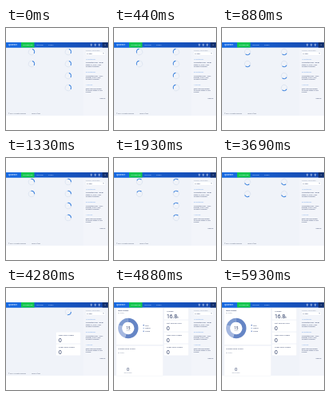
Write an HTML page that moves like this. It is 128 px wide and 128 px high and loops after 8.18 s.

```html
<!DOCTYPE html>
<html lang="en">
<head>
<meta charset="utf-8">
<title>Work order dashboard</title>
<style>
html, body { margin: 0; width: 100%; height: 100%; overflow: hidden; background: #fff; }
svg { display: block; width: 100vw; height: 100vh; font-family: Roboto, Arial, sans-serif; }
</style>
</head>
<body>
<svg id="stage" viewBox="0 0 128 128"></svg>
<script>
const LOOP = 8180, FIRST = 135, STEP = 147.9, TURN = 77, START = -22;
const BLUE = '#2b78dc', NAVY = '#2c3c66', GREY = '#8a94aa';

const rect = (x, y, w, h, fill, more = '') =>
  `<rect x="${x}" y="${y}" width="${w}" height="${h}" fill="${fill}" ${more}/>`;
const text = (x, y, size, fill, str, more = '') =>
  `<text x="${x}" y="${y}" font-size="${size}" fill="${fill}" ${more}>${str}</text>`;
const ring = (x, y, r, color, width, more = '') =>
  `<circle cx="${x}" cy="${y}" r="${r}" fill="none" stroke="${color}" stroke-width="${width}" ${more}/>`;
const card = (x, y, w, h) =>
  rect(x, y + .3, w, h, '#e3e7f0', 'rx=".5"') + rect(x, y, w, h, '#fff', 'rx=".5"');

function header() {
  const icons = [107, 112, 117].map(x =>
    ring(x, 20.7, .75, '#e6efff', .55) + rect(x - .8, 21.8, 1.6, .6, '#e6efff')).join('');
  return rect(0, 18, 128, 6.5, 'url(#bar)') + rect(0, 18, 19, 6.5, '#1769e0') +
    rect(19, 18, 16.5, 6.5, '#12c64f') + rect(121, 18, 7, 6.5, '#12306f') +
    text(3, 22.1, 2.8, '#fff', 'opsmere') +
    text(21.5, 22, 2.1, '#fff', 'DASHBOARD') +
    text(38, 22, 2.1, '#dce8ff', 'ANALYZE') + text(53, 22, 2.1, '#dce8ff', 'TOOLS') +
    icons + text(124.5, 22.1, 2.4, '#fff', '≡', 'text-anchor="middle"');
}

function sidebar() {
  const news = [
    [39.6, '12 minutes ago', ['Completed order - Pump', 'station 2, Floor 1 was', 'closed by Operator']],
    [55.8, '25 minutes ago', ['Completed order - Main', 'building, Floor 2 was', 'closed by Operator']],
    [71.8, '1 hour ago', ['New order was added', 'for Pump station 2 and', 'is open']]
  ];
  return rect(97, 24.5, 31, 85.5, '#f3f5fa') +
    text(100, 28.6, 2, GREY, 'LATEST ACTIVITIES') +
    rect(100, 30, 24.5, 4.2, '#fff', 'stroke="#e2e7f0" stroke-width=".3"') +
    text(101, 32.9, 2, NAVY, 'All Sites') +
    '<path d="M121.4 31.6h1.6l-.8 1z" fill="#607092"/>' +
    news.map(([y, when, lines]) => text(100, y, 1.8, '#6a9ee5', when) +
      lines.map((s, i) => text(100, y + 4.8 + i * 2.4, 2.05, NAVY, s)).join('')).join('') +
    text(124.5, 88.6, 2, NAVY, 'View all', 'text-anchor="end"');
}

function metric(id, y, label, value, unit = '') {
  return `<g id="${id}">` + card(63, y, 30.5, 14.3) +
    text(66, y + 5, 2.4, NAVY, label) +
    text(66, y + 12.6, 6.8, NAVY, `${value}<tspan font-size="3">${unit}</tspan>`) + '</g>';
}

function donut() {
  const len = 2 * Math.PI * 10.2;
  const parts = [[0, .55, '#6585c5'], [.55, .25, '#a5b8e0'], [.8, .2, '#7d9ad0']];
  return parts.map(([from, part, color]) =>
    ring(17.8, 50.5, 10.2, color, 5,
      `stroke-dasharray="${part * len} ${len}" transform="rotate(${from * 360 - 90} 17.8 50.5)"`)).join('');
}

function orders() {
  const legend = [['#6585c5', 'Open'], ['#a5b8e0', 'Waiting'], ['#7d9ad0', 'Closed']];
  return '<g id="orders">' + card(3, 25.4, 58.5, 46.2) +
    text(5, 29.1, 2.4, NAVY, 'Work Orders', 'font-weight="500"') +
    text(5, 32.2, 1.9, GREY, 'By status') + donut() +
    text(17.8, 51.8, 4.6, NAVY, '15', 'text-anchor="middle"') +
    text(17.8, 54.4, 1.8, GREY, 'Orders', 'text-anchor="middle"') +
    legend.map(([color, label], i) => rect(36.5, 46 + i * 3.8, 1.4, 1.4, color) +
      text(38.9, 47.5 + i * 3.8, 2, NAVY, label)).join('') + '</g>';
}

function overdue() {
  return '<g id="overdue">' + card(3, 72.8, 58.5, 37.2) +
    text(5, 76.8, 2.3, NAVY, 'Overdue Work Orders') +
    text(5, 81.5, 1.9, GREY, 'By status') +
    text(17.5, 103.6, 5.5, NAVY, '0', 'text-anchor="middle"') +
    text(17.5, 106.6, 1.8, GREY, 'Work Orders', 'text-anchor="middle"') + '</g>';
}

// Place of each spinner and the step at which it goes away.
const spinners = [[32, 30, 29], [78, 30, 30], [32, 45, 29], [78, 45, 29], [78, 60, 25], [78, 75, 25]];
const spinner = ([x, y]) => '<g class="spin">' + ring(x, y, 3.7, '#dbe3f0', .8) +
  ring(x, y, 3.7, BLUE, .95, 'stroke-dasharray="6.5 30"') + '</g>';

const stage = document.getElementById('stage');
stage.innerHTML = `<defs><linearGradient id="bar">
  <stop stop-color="#1769e0"/><stop offset="1" stop-color="#1546aa"/></linearGradient></defs>` +
  rect(0, 18, 128, 92, '#f0f3f9') + sidebar() + header() +
  text(3, 107.8, 1.9, '#59647c', '© 2019 All rights reserved') +
  text(32, 107.8, 1.9, '#59647c', 'Terms of use') +
  spinners.map(spinner).join('') +
  metric('time', 25.4, 'Average', '16.8', 'h') +
  metric('late', 40.4, 'Not This Day Only', '0') +
  metric('open', 55.4, 'Open Work Orders', '0') +
  metric('today', 70.4, 'Today Work Orders', '0') + orders() + overdue();

const spins = [...stage.querySelectorAll('.spin')];
const shownFrom = { time: 30, late: 30, open: 26, today: 26, orders: 31, overdue: 31 };
const show = (el, on) => el.setAttribute('visibility', on ? 'visible' : 'hidden');
const get = id => document.getElementById(id);

function draw(now) {
  const t = now % LOOP;
  const step = t < FIRST ? 0 : Math.min(33, 1 + Math.floor((t - FIRST) / STEP));
  spins.forEach((el, i) => {
    const [x, y, end] = spinners[i];
    show(el, step < end);
    // The dash begins at three o'clock and spans 100 degrees; centre it.
    el.setAttribute('transform', `rotate(${START - 50 + step * TURN} ${x} ${y})`);
  });
  for (const id in shownFrom) show(get(id), step >= shownFrom[id]);
  requestAnimationFrame(draw);
}
draw(0);
</script>
</body>
</html>
```
